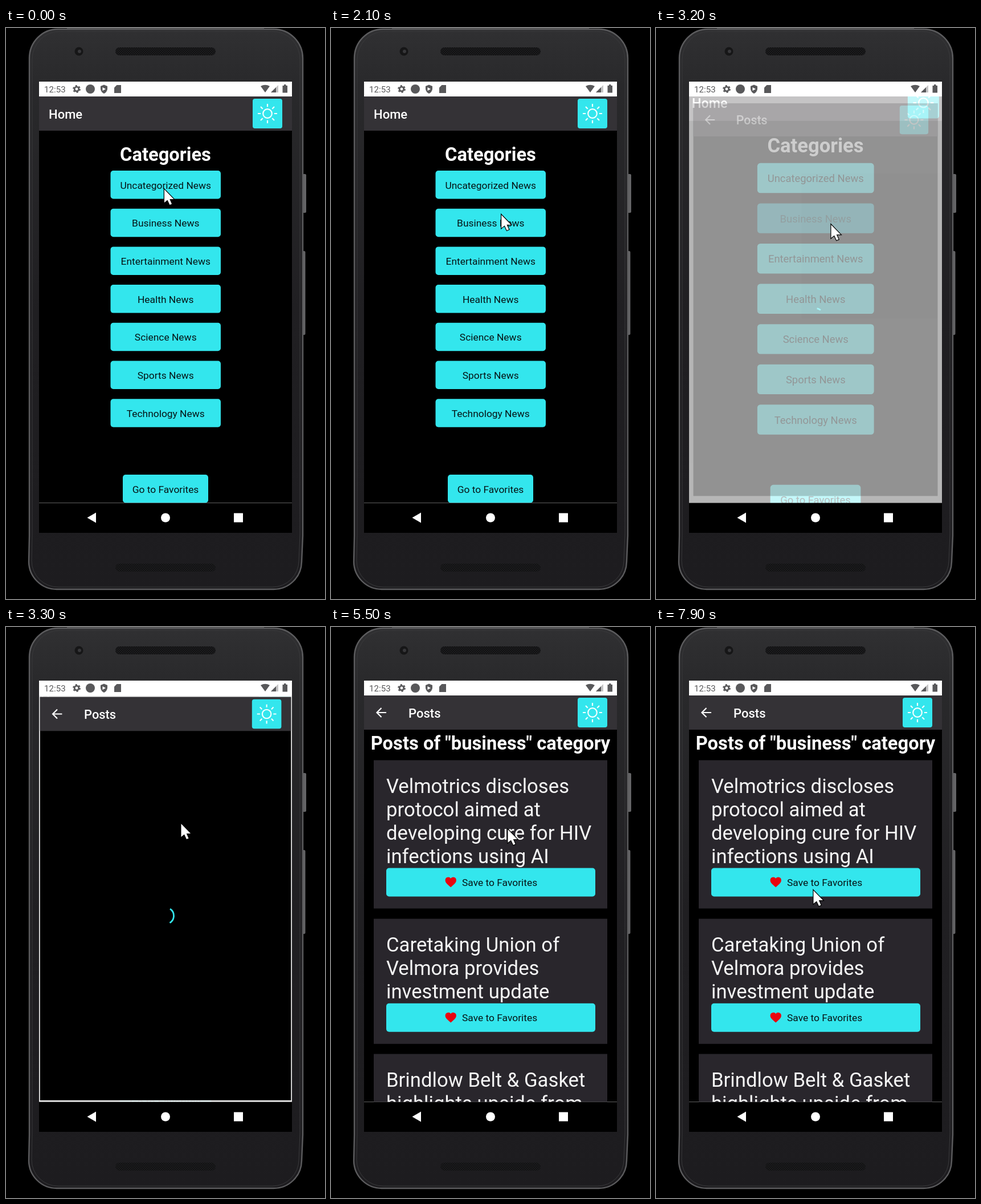
These frames come from a looping animation (560 px wide and 1001 px high, 8000 ms). An HTML page:

```html
<!DOCTYPE html>
<html lang="en">
<head>
<meta charset="utf-8">
<title>News app</title>
<style>
  html, body { margin: 0; width: 100%; height: 100%; overflow: hidden; background: #000; }
  svg { display: block; width: 100vw; height: 100vh; font-family: Roboto, sans-serif; }
  .button { fill: #33e6ed; }
  .button.pressed { fill: #119eac; }
  .label { font-size: 17.4px; fill: #061416; }
  .pressed + .label { fill: #073c42; }
  .middle { text-anchor: middle; }
  .heading { font-size: 32.7px; font-weight: 700; fill: #fff; text-anchor: middle; }
  .bar { font-size: 22px; font-weight: 500; fill: #fff; }
  .story { font-size: 34.7px; fill: #f5f5f5; }
</style>
</head>
<body>
<svg viewBox="0 0 560 1001">
  <defs>
    <linearGradient id="shell" x2="0" y2="1">
      <stop offset="0" stop-color="#303032"/>
      <stop offset=".1" stop-color="#29292b"/>
      <stop offset=".5" stop-color="#201f22"/>
      <stop offset="1" stop-color="#1d1c1f"/>
    </linearGradient>
    <pattern id="mesh" width="4" height="4" patternUnits="userSpaceOnUse">
      <rect width="4" height="4" fill="#111112"/>
      <circle cx="1" cy="1" r=".8" fill="#2a2a2c"/>
      <circle cx="3" cy="3" r=".8" fill="#2a2a2c"/>
    </pattern>
    <clipPath id="appArea"><rect x="58" y="120" width="444" height="712.5"/></clipPath>
    <g id="sun">
      <rect x="433" y="124" width="52" height="52" rx="4" fill="#33e6ed"/>
      <g id="rays" fill="none" stroke="#f2ffff" stroke-width="2.2" transform="translate(459 150)">
        <circle r="7.8"/>
      </g>
    </g>
    <path id="heart" fill="#e9040f" d="M12 21C4 14 2 12 2 8.5A5.5 5.5 0 0 1 12 5A5.5 5.5 0 0 1 22 8.5C22 12 20 14 12 21Z"/>
  </defs>

  <rect width="560" height="1001"/>
  <g fill="#646466">
    <rect x="519" y="256" width="8" height="68" rx="2"/>
    <rect x="519" y="391" width="6.5" height="147" rx="2"/>
    <rect x="107" width="346" height="3" fill="#4a4a4c"/>
  </g>
  <path fill="url(#shell)" stroke="#5c5c5e" stroke-width="2.4" d="M91 2H470A51 51 0 0 1 521 53V890L519 936A49 49 0 0 1 470 984H89A49 49 0 0 1 40 936L41 890V53A50 51 0 0 1 91 2Z"/>
  <path fill="none" stroke="#39393b" d="M94 6H468A48 49 0 0 1 516 55V888L514 934A46 46 0 0 1 468 980H92A46 46 0 0 1 45 934L46 888V55A48 49 0 0 1 94 6Z"/>
  <rect x="192" y="34" width="176" height="14" rx="7" fill="url(#mesh)"/>
  <rect x="192" y="939" width="176" height="14" rx="7" fill="url(#mesh)"/>
  <circle cx="128" cy="41" r="7.5" fill="#161617"/>
  <circle cx="129" cy="41" r="3" fill="#37373a"/>

  <rect x="58" y="94" width="444" height="791"/>
  <rect x="58" y="94" width="444" height="26" fill="#fff"/>
  <g fill="#58585a">
    <text x="67" y="112.5" font-size="15" letter-spacing=".1">12:53</text>
    <circle cx="124" cy="107" r="3.8" fill="none" stroke="#58585a" stroke-width="2.8"/>
    <circle cx="124" cy="107" r="5.9" fill="none" stroke="#58585a" stroke-width="2" stroke-dasharray="3.1"/>
    <circle cx="148" cy="107" r="8"/>
    <path d="M172 99.5L178 102V107Q177.500 112 172 115Q166.500 112 166 107V102Z"/>
    <path fill="#fff" d="M169.500 104L175 107L169.500 110Z"/>
    <path d="M194.500 100H202V114H190V104.500Z"/>
    <path d="M447 102Q455 97.500 463 102L455 113Z"/>
    <path fill="#c4c4c5" d="M478 100V113H465Z"/>
    <path d="M474 104V113H465Z"/>
    <path d="M488 99H491.500V101H494V113.500H485.500V101H488Z"/>
  </g>

  <g clip-path="url(#appArea)">
    <rect x="58" y="120" width="444" height="713" fill="#fff"/>
    <g id="home"></g>
    <g id="posts"></g>
  </g>

  <g fill="#fff">
    <path d="M142.500 858.500L158 849.500V867.500Z"/>
    <circle cx="280" cy="858.500" r="8"/>
    <rect x="400" y="850.500" width="16" height="16"/>
  </g>
  <path id="cursor" fill="#fff" stroke="#000" stroke-width="2.4" paint-order="stroke" d="M0 0V23L5.500 18.500L9.500 27L13 25.500L9.300 17H16.500Z"/>
</svg>

<script>
const LOOP = 8000, STEP = 100;
const PRESS_AT = 3000, OPEN_AT = 3092, OPEN_MS = 400, LOADED_AT = 5100;
const $ = id => document.getElementById(id);
const clamp = v => Math.min(1, Math.max(0, v));

const rect = (x, y, w, h, attrs) => `<rect x="${x}" y="${y}" width="${w}" height="${h}" ${attrs}/>`;
const text = (x, y, cls, str) => `<text x="${x}" y="${y}" class="${cls}">${str.replace('&', '&amp;')}</text>`;
const button = (x, y, w, label) =>
  rect(x, y, w, 49.5, 'rx="5" class="button"') + text(x + w / 2, y + 31.5, 'label middle', label);
const page = (titleX, title) =>
  rect(58, 120, 444, 712.5, '') + rect(58, 120, 444, 60, 'fill="#343236"') +
  text(titleX, 158.5, 'bar', title) + '<use href="#sun"/>';

function card(top, lines) {
  const buttonTop = top + 26.2 + lines.length * 40.7;
  return rect(75, top, 410, buttonTop + 71 - top, 'fill="#29262c"') +
    lines.map((line, i) => text(97, top + 57.5 + i * 41, 'story', line)).join('') +
    rect(97, buttonTop, 367, 50, 'rx="5" class="button"') +
    `<use href="#heart" transform="translate(198.700 ${buttonTop + 13.5}) scale(.96)"/>` +
    text(230, buttonTop + 31.5, 'label', 'Save to Favorites');
}

for (let i = 0; i < 8; i++)
  $('rays').innerHTML += `<path d="M0 -11.800V-17" transform="rotate(${i * 45})"/>`;

const categories = ['Uncategorized', 'Business', 'Entertainment', 'Health', 'Science', 'Sports', 'Technology'];
$('home').innerHTML = page(75, 'Home') + text(280, 232.5, 'heading', 'Categories') +
  categories.map((name, i) => button(183.5, 250 + i * 66.7, 193.5, name + ' News')).join('') +
  button(205, 783, 150, 'Go to Favorites');
const businessButton = $('home').querySelectorAll('.button')[1];

$('posts').innerHTML = page(136, 'Posts') +
  '<path d="M97 150H81M88.500 142L80.500 150L88.500 158" fill="none" stroke="#fff" stroke-width="2.2"/>' +
  '<path id="spinner" fill="none" stroke="#33e6ed" stroke-width="2.8"/><g id="feed">' +
  text(280, 215, 'heading', 'Posts of "business" category') +
  card(233.5, ['Velmotrics discloses', 'protocol aimed at', 'developing cure for HIV', 'infections using AI']) +
  card(511.5, ['Caretaking Union of', 'Velmora provides', 'investment update']) +
  card(748.5, ['Brindlow Belt & Gasket', 'highlights upside from', 'new plant']) + '</g>';

function bezier(x1, y1, x2, y2) {
  const at = (a, b, s) => 3 * a * s * (1 - s) ** 2 + 3 * b * s * s * (1 - s) + s ** 3;
  return x => {
    x = clamp(x);
    if (x === 0 || x === 1) return x;
    let lo = 0, hi = 1;
    for (let i = 0; i < 24; i++) {
      const mid = (lo + hi) / 2;
      if (at(x1, x2, mid) < x) lo = mid; else hi = mid;
    }
    return at(y1, y2, hi);
  };
}
const openEase = bezier(.20833, .82, .25, 1);
const standardEase = bezier(.4, 0, .2, 1);

// time, x, y of the pointer tip; each leg is one eased gesture
const pointerStops = [[700, 278, 283], [2850, 307.5, 345], [5100, 307.5, 345],
  [5500, 310.5, 355], [7300, 276.5, 462], [LOOP, 276.5, 462]];
function pointerAt(t) {
  const next = Math.max(1, pointerStops.findIndex(stop => stop[0] >= t));
  const [t0, x0, y0] = pointerStops[next - 1], [t1, x1, y1] = pointerStops[next];
  const u = clamp((t - t0) / (t1 - t0)), k = u * u * (3 - 2 * u);
  return [x0 + (x1 - x0) * k, y0 + (y1 - y0) * k];
}

// Material indeterminate ring: the head runs ahead, then the tail catches up.
function spinnerPath(age) {
  const cycle = age / 1333 % 1, turn = Math.PI * 2;
  const tail = .75 * standardEase(cycle * 2 - 1);
  const head = .75 * standardEase(cycle * 2) + .02;
  const base = cycle / 4 + age * 2 / 4444 - .289;
  const point = f => `${280 + 14.6 * Math.cos(f * turn)} ${506.5 + 14.6 * Math.sin(f * turn)}`;
  return `M${point(base + tail)}A14.6 14.6 0 ${head - tail > .5 ? 1 : 0} 1 ${point(base + head)}`;
}

function place(el, scale, opacity) {
  el.setAttribute('transform', `translate(280 476) scale(${scale}) translate(-280 -476)`);
  el.setAttribute('opacity', opacity);
}

function draw(now) {
  const t = Math.floor(now % LOOP / STEP) * STEP;
  const open = openEase((t - OPEN_AT) / OPEN_MS);
  place($('home'), 1 + .075 * open, 1 - clamp((open - .2075) / .7925));
  place($('posts'), .85 + .15 * open, clamp((open - .75) / .125));
  businessButton.classList.toggle('pressed', t >= PRESS_AT);

  const loaded = t >= LOADED_AT;
  $('feed').style.display = loaded ? '' : 'none';
  $('spinner').style.display = loaded ? 'none' : '';
  $('spinner').setAttribute('d', spinnerPath(Math.max(0, t - OPEN_AT)));
  $('cursor').setAttribute('transform', `translate(${pointerAt(t)})`);
}

const start = performance.now();
function tick() {
  draw(performance.now() - start);
  requestAnimationFrame(tick);
}
tick();
</script>
</body>
</html>
```
